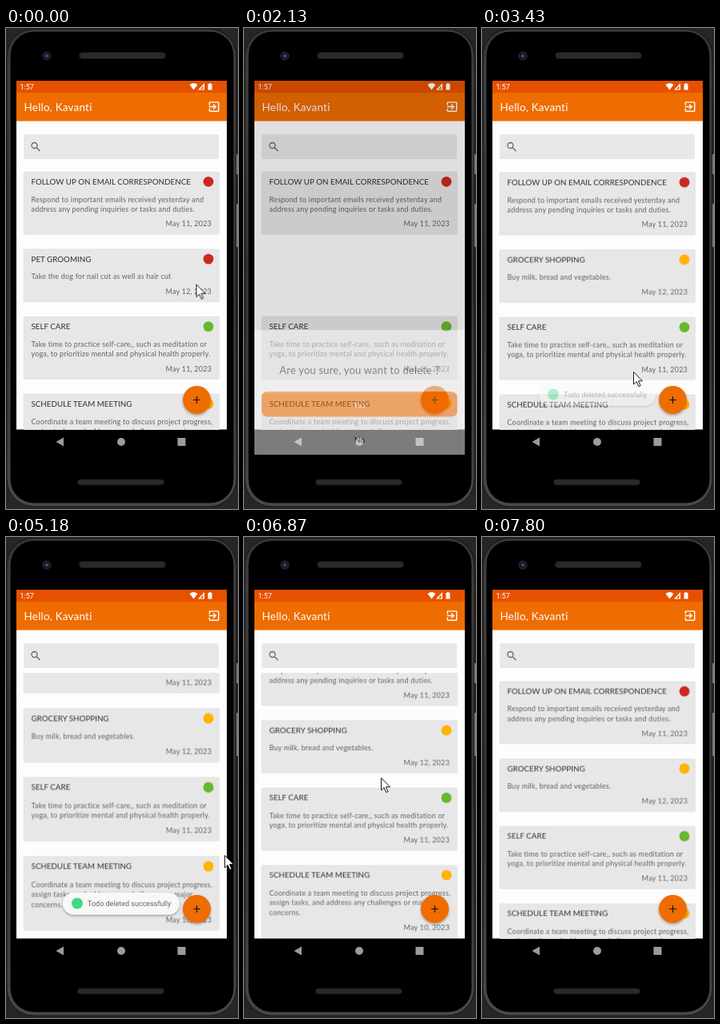
An HTML page for the animation above (8.07 s loop, 290 by 602 pixels).

```html
<!DOCTYPE html>
<html lang="en">
<head>
<meta charset="utf-8">
<title>Todo list</title>
<style>
  html, body { margin: 0; width: 100%; height: 100%; overflow: hidden; background: #262626; }
  svg { display: block; width: 290px; height: 602px; }
  text { font-family: Lato, "Open Sans", sans-serif; white-space: pre; }
  .title { font-size: 9.8px; fill: #303030; }
  .body { font-size: 9px; letter-spacing: .2px; fill: #636363; }
  .end { text-anchor: end; }
  .mid { text-anchor: middle; }
  .head { font-size: 13.5px; letter-spacing: .2px; fill: #fff; }
  .ask { font-size: 13px; letter-spacing: .2px; fill: #333; }
  .btn { font-size: 10px; }
  .ui { font-family: Roboto, "Noto Sans", sans-serif; font-size: 9px; }
  #list { transform-origin: 0 503px; }
</style>
</head>
<body>
<svg viewBox="0 0 290 602" xmlns="http://www.w3.org/2000/svg">
  <defs>
    <clipPath id="listClip"><rect x="13" y="170.5" width="263" height="332"/></clipPath>
    <clipPath id="rowClip"><rect x="13" y="267" width="263" height="85"/></clipPath>
    <clipPath id="screenClip"><rect x="13" y="66" width="263" height="468"/></clipPath>
    <linearGradient id="metal" x2="0" y2="1">
      <stop offset="0" stop-color="#303030"/>
      <stop offset=".1" stop-color="#3c3c3c"/>
      <stop offset=".5" stop-color="#2c2c2c"/>
      <stop offset="1" stop-color="#484848"/>
    </linearGradient>
    <filter id="soft" x="-30%" y="-30%" width="160%" height="170%">
      <feDropShadow dx="0" dy="1.5" stdDeviation="1.6" flood-opacity=".35"/>
    </filter>
  </defs>

  <!-- phone -->
  <rect width="290" height="602" fill="#262626"/>
  <rect x="1" y="1" width="287" height="598" rx="34" fill="url(#metal)" stroke="#161616"/>
  <rect x="5" y="4" width="280" height="591" rx="30" fill="#000" stroke="#4a4a4a"/>
  <path d="M289 158v25M289 220v54" stroke="#777" stroke-width="2"/>
  <g fill="#2a2a2a" stroke="#161616">
    <rect x="91.5" y="30.5" width="108" height="8" rx="4"/>
    <rect x="89.5" y="565" width="108" height="7" rx="3.5"/>
  </g>
  <circle cx="51" cy="35" r="5" fill="#161a22" stroke="#2b2f38"/>
  <circle cx="51" cy="35" r="2" fill="#34507c"/>

  <!-- screen -->
  <rect x="13" y="66" width="263" height="436.5" fill="#fdfdfd"/>
  <rect x="13" y="66" width="263" height="15" fill="#e65100"/>
  <rect x="13" y="81" width="263" height="35.5" fill="#ef6c00"/>
  <text class="ui" x="17.5" y="76.5" fill="#fff">1:57</text>
  <g fill="#fff">
    <path d="M229.5 71q5-4 10 0l-5 6.5z"/>
    <path d="M252.5 70h1.5v-1h2v1h1.5v7.5h-5z"/>
    <path d="M248 69v8.5h-8z"/>
    <path d="M246.5 72.5v4h-3.5z" fill="#e65100"/>
    <path transform="translate(251.5 90) scale(.71)" d="M10.1 15.6L11.5 17l5-5-5-5-1.4 1.4L12.7 11H3v2h9.7zM19 3H5c-1.1 0-2 .9-2 2v4h2V5h14v14H5v-4H3v4c0 1.1.9 2 2 2h14c1.1 0 2-.9 2-2V5c0-1.1-.9-2-2-2z"/>
  </g>
  <text class="head" x="22.5" y="104">Hello, Kavanti</text>
  <rect x="22" y="133" width="244" height="31" rx="2" fill="#e8e8e8"/>
  <g fill="none" stroke="#666" stroke-width="1.3">
    <circle cx="35.5" cy="147" r="3.5"/>
    <path d="M38.2 149.7l4.300 4.300"/>
  </g>

  <g clip-path="url(#listClip)"><g id="list"></g></g>
  <g clip-path="url(#rowClip)"><g id="ripple"></g></g>

  <circle cx="238.5" cy="465.5" r="17.5" fill="#ef6c00" filter="url(#soft)"/>
  <path d="M234 465.500h9M238.500 461v9" stroke="#111" stroke-width="1.2"/>

  <g id="toast">
    <rect x="71" y="445" width="146" height="27.5" rx="13.7" fill="#f8f8f8" filter="url(#soft)"/>
    <circle cx="89" cy="458.5" r="7" fill="#3ddc84"/>
    <text class="ui" x="102" y="461.7" fill="#666">Todo deleted successfully</text>
  </g>

  <!-- system buttons -->
  <g fill="#9b9b9b">
    <path d="M62.5 518l9.500-5.500v11z"/>
    <circle cx="144" cy="518" r="5"/>
    <rect x="214.5" y="513" width="10" height="10" rx=".5"/>
  </g>

  <g clip-path="url(#screenClip)">
    <g id="modal">
      <rect x="13" y="66" width="263" height="437" fill-opacity=".22"/>
      <g id="sheet">
        <rect x="13" y="347" width="263" height="156" fill="#e2e2e2"/>
        <text class="ask mid" x="144.5" y="401.5">Are you sure, you want to delete ?</text>
        <rect x="22" y="424" width="244.5" height="31.5" rx="7" fill="#ef6c00"/>
        <text class="btn mid" x="144.5" y="443.5" fill="#fff">Yes</text>
        <text class="btn mid" x="144.5" y="487.5" fill="#222">No</text>
      </g>
    </g>
  </g>

  <path id="cursor" d="M.5.5v15.5l3.600-3.400 2.700 6 2.300-1-2.600-5.800h5z" fill="#fff" stroke="#000" stroke-width=".9"/>
</svg>

<script>
const LOOP = 8070, LINE = 12.3, GAP = 18.5;
const RED = '#cc2820', GREEN = '#66b82e', AMBER = '#ffb300';
const $ = id => document.getElementById(id);

const cardHeight = lines => 66 + LINE * (lines.length - 1);

function card(top, { id, title, color, lines, date }) {
  const height = cardHeight(lines);
  const body = lines.map((s, i) =>
    `<text class="body" x="31.5" y="${top + 37.5 + LINE * i}">${s}</text>`).join('');
  return `<g id="${id}">
    <rect x="22" y="${top}" width="244.5" height="${height}" rx="1.5" fill="#e7e7e7" stroke="#000" stroke-opacity=".05"/>
    <text class="title" x="31.5" y="${top + 15.8}">${title}</text>
    <circle cx="253" cy="${top + 12.3}" r="6.4" fill="${color}"/>
    ${body}<text class="body end" x="257" y="${top + height - 10}">${date}</text></g>`;
}

const todos = [
  { id: 'mail', title: 'FOLLOW UP ON EMAIL CORRESPONDENCE', color: RED, date: 'May 11, 2023',
    lines: ['Respond to important emails received yesterday and',
            'address any pending inquiries or tasks and duties.'] },
  { id: 'pet', title: 'PET GROOMING', color: RED, date: 'May 12, 2023',
    lines: ['Take the dog for nail cut as well as hair cut'] },
  { id: 'grocery', title: 'GROCERY SHOPPING', color: AMBER, date: 'May 12, 2023',
    lines: ['Buy milk, bread and vegetables.'] },
  { id: 'care', title: 'SELF CARE', color: GREEN, date: 'May 11, 2023',
    lines: ['Take time to practice self-care,, such as meditation or',
            'yoga, to prioritize mental and physical health properly.'] },
  { id: 'team', title: 'SCHEDULE TEAM MEETING', color: AMBER, date: 'May 10, 2023',
    lines: ['Coordinate a team meeting to discuss project progress,',
            'assign tasks, and address any challenges or major',
            'concerns.'] },
];

let top_ = 180;
for (const todo of todos) {
  $('list').innerHTML += card(top_, todo);
  // the grocery card later takes the slot of the pet card
  if (todo.id !== 'pet') top_ += cardHeight(todo.lines) + GAP;
}

for (let r = 78; r > 20; r -= 10)
  $('ripple').innerHTML += `<circle cx="143" cy="312" r="${r}" fill-opacity=".025"/>`;

// Key: [time, values, n]. The value goes to the next key in n equal jumps;
// without n it holds until then.
function play(id, keys, style) {
  const frames = keys.map(([t, v, n = 1]) =>
    ({ offset: t / LOOP, easing: `steps(${n})`, ...style(...[v].flat()) }));
  frames.push({ ...frames[frames.length - 1], offset: 1 });
  $(id).animate(frames, { duration: LOOP, iterations: Infinity });
}
const fade = a => ({ opacity: a });
const move = (x, y = 0) => ({ transform: `translate(${x}px, ${y}px)` });
const scroll = (y, stretch = 1) => ({ transform: `scaleY(${stretch}) translateY(${-y}px)` });

play('pet', [[0, 0], [1650, -57, 2], [1890, -270]], move);
play('ripple', [[0, 0], [1650, 1, 3], [2010, 0]], fade);
play('modal', [[0, 0], [2010, .15], [2130, .55, 2], [2400, 1], [3430, 0]], fade);
play('sheet', [[0, [0, 31]], [2280, [0, 0]]], move);
play('grocery', [[0, 0], [3430, 1]], fade);
play('toast', [[0, 0], [3430, .4, 2], [3690, 1], [5590, 1, 4], [6080, 0]], fade);
play('list', [[0, 0], [3430, -.8], [5180, [56.2, 1.022], 3], [5570, 56.2],
  [6870, 47.2, 5], [7530, -.8]], scroll);
play('cursor', [[0, [237.5, 320.5]], [1650, [99, 330], 4], [2130, [-20, 345]],
  [2550, [148, 401], 2], [2850, [189, 430]], [3960, [189, 430], 3], [4330, [277, 418]],
  [5180, [273, 398], 3], [5570, [267, 354], 4], [6080, [258, 580]],
  [6320, [256, 559], 2], [6590, [171, 301]], [6870, [171, 301], 3],
  [7260, [184, 372], 2], [7530, [256, 581], 2], [7800, [300, 610]]], move);
</script>
</body>
</html>
```
